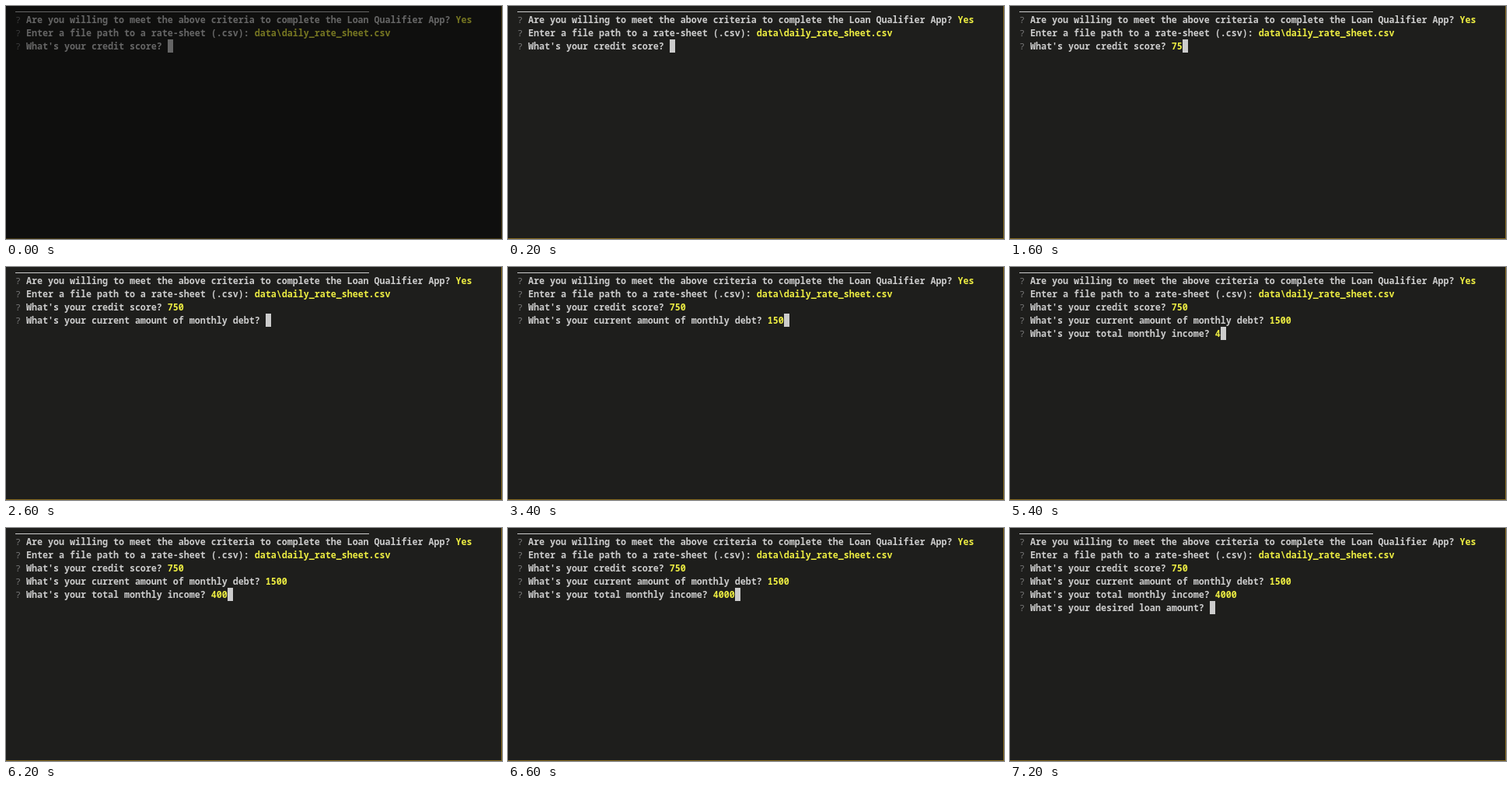
Write an HTML page that moves like this. It is 638 by 300 pixels and loops after 8 s.

```html
<!DOCTYPE html>
<html lang="en">
<head>
<meta charset="utf-8">
<title>Loan qualifier prompt</title>
<style>
  html, body { margin: 0; width: 100%; height: 100%; overflow: hidden; background: #1e1e1c; }
  #stage { position: relative; width: 638px; height: 300px; overflow: hidden; background: #1e1e1c; }
  #stage::after {
    content: ""; position: absolute; inset: 0; box-sizing: border-box;
    border: solid #84681f; border-width: 0 1px 1px 0;
  }
  #rule { position: absolute; left: 12px; top: 7px; width: 455px; height: 1px; background: #ccc; }
  #term {
    position: absolute; left: 12px; top: 9px; margin: 0;
    font: 600 11.667px/17px "Noto Sans Mono", "DejaVu Sans Mono", monospace;
    font-variant-ligatures: none; color: #ccc; white-space: pre;
  }
  .mark { color: #787878; font-weight: 400; }
  .answer { color: #eded42; }
  #cursor { position: absolute; width: 7px; height: 17px; background: #ccc; }
  #shade { position: absolute; inset: 0; z-index: 1; background: #000; opacity: .5; }
</style>
</head>
<body>
<div id="stage">
  <div id="rule"></div>
  <pre id="term"></pre>
  <div id="cursor"></div>
  <div id="shade"></div>
</div>
<script>
const LOOP = 8000, CELL = 7, ROW = 17, LEFT = 12, TOP = 9;

// keys: [time, text typed so far]
const prompts = [
  { at: 0, ask: "Are you willing to meet the above criteria to complete the Loan Qualifier App?", keys: [[0, "Yes"]] },
  { at: 0, ask: "Enter a file path to a rate-sheet (.csv):", keys: [[0, "data\\daily_rate_sheet.csv"]] },
  { at: 0, ask: "What's your credit score?", keys: [[1600, "75"], [2000, "750"]] },
  { at: 2600, ask: "What's your current amount of monthly debt?", keys: [[2800, "15"], [3200, "150"], [3600, "1500"]] },
  { at: 4400, ask: "What's your total monthly income?", keys: [[5400, "4"], [5800, "40"], [6200, "400"], [6400, "4000"]] },
  { at: 7000, ask: "What's your desired loan amount?", keys: [] }
];

const $ = id => document.getElementById(id);

function span(parent, text, cls) {
  const el = document.createElement("span");
  el.textContent = text;
  if (cls) el.className = cls;
  parent.append(el);
  return el;
}

for (const p of prompts) {
  p.row = document.createElement("div");
  span(p.row, "? ", "mark");
  span(p.row, p.ask + " ");
  p.out = span(p.row, "", "answer");
  $("term").append(p.row);
}

function typed(keys, t) {
  let text = "";
  for (const [at, value] of keys) if (t >= at) text = value;
  return text;
}

function draw(t) {
  prompts.forEach((p, i) => {
    const shown = t >= p.at;
    p.row.style.display = shown ? "" : "none";
    if (!shown) return;
    const text = typed(p.keys, t);
    if (p.out.textContent !== text) p.out.textContent = text;
    $("cursor").style.left = LEFT + CELL * (p.ask.length + 3 + text.length) + "px";
    $("cursor").style.top = TOP + ROW * i + "px";
  });
  $("shade").style.display = t < 200 ? "" : "none";
}

const start = performance.now();
function tick() {
  draw((performance.now() - start) % LOOP);
  requestAnimationFrame(tick);
}
draw(0);
requestAnimationFrame(tick);
</script>
</body>
</html>
```
